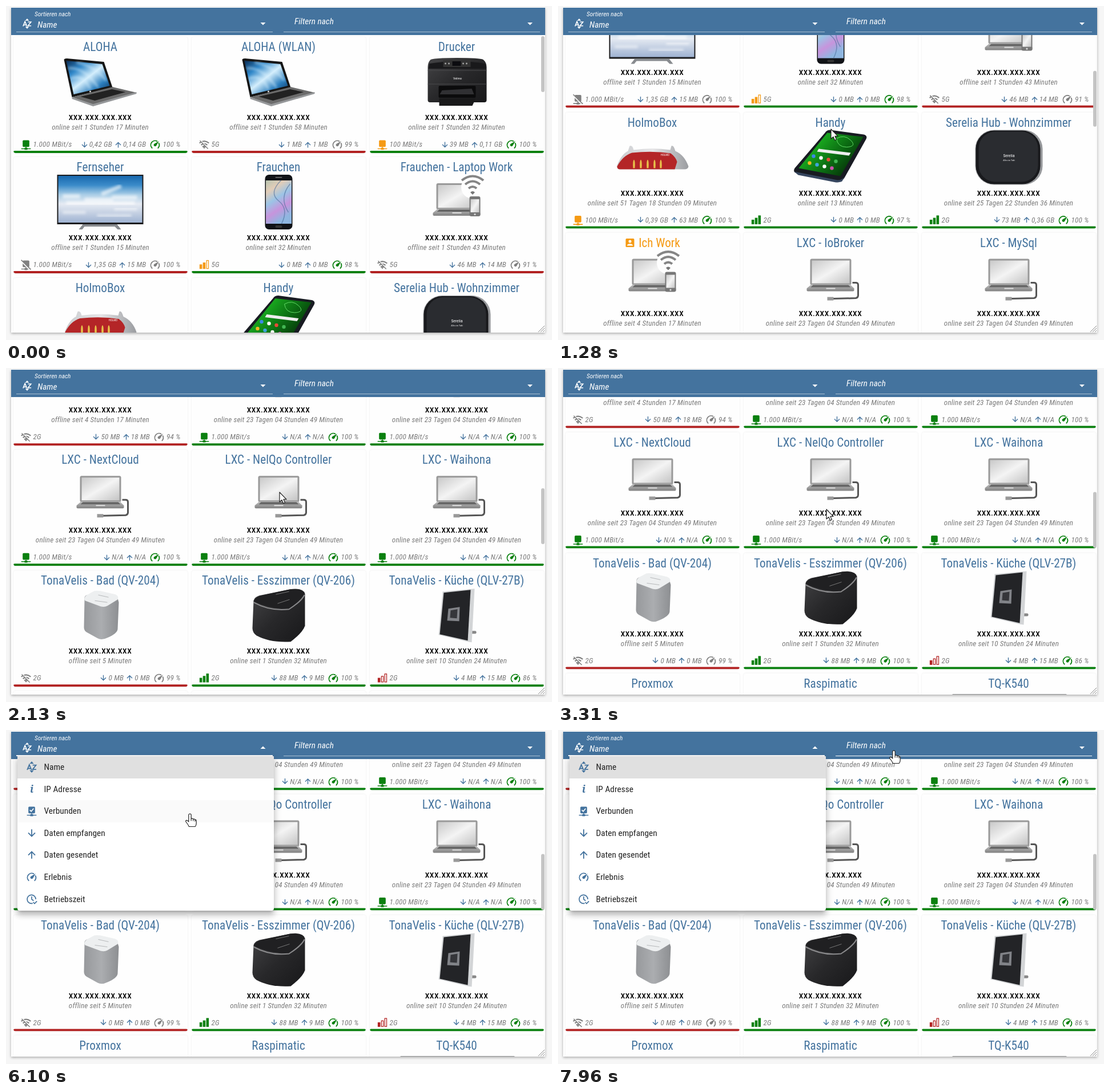
Write an HTML page that moves like this. It is 956 px wide and 586 px high and loops after 8000 ms.

```html
<!DOCTYPE html>
<html lang="de">
<head>
<meta charset="utf-8">
<title>Netzwerkgeräte</title>
<style>
:root { --blue: #44739e; --track: 0em; }
* { box-sizing: border-box; letter-spacing: var(--track); }
html, body { margin: 0; width: 100%; height: 100%; overflow: hidden; background: #f6f6f6; }
body { font-family: "Roboto Condensed", Roboto, sans-serif; font-stretch: 75%; white-space: pre; }
.abs { position: absolute; }
svg { display: block; overflow: visible; flex: none; }
#panel { left: 9px; top: 2px; width: 935px; height: 571px; background: #fff; overflow: hidden; }
#shadow { left: 9px; top: 3px; width: 935px; height: 570px; box-shadow: 0 2px 4px rgba(0,0,0,.22), 0 1px 6px rgba(0,0,0,.1); }
#view { left: 0; top: 49px; width: 935px; height: 522px; overflow: hidden; }
.card { position: absolute; width: 305px; height: 204px; border-radius: 4px; background: #fefefe;
  box-shadow: 0 0 3px rgba(0,0,0,.09); text-align: center; overflow: hidden; }
.card > * { position: absolute; left: 0; width: 100%; }
.title { top: 3px; line-height: 30px; font-size: 21.2px; color: var(--blue); display: flex; justify-content: center; align-items: center; gap: 5px; }
.pic { top: 31px; }
.ip { top: 131px; line-height: 20px; font-size: 13.5px; font-weight: 500; color: #000; letter-spacing: calc(var(--track) + .045em); }
.since, .stats { line-height: 20px; font-size: 13.2px; font-style: italic; color: #7b7b7b; }
.since { top: 149px; letter-spacing: calc(var(--track) + .01em); }
.stats { top: 179px; padding: 0 12px; display: flex; align-items: center; }
.stats span { margin-left: 3px; letter-spacing: calc(var(--track) + .015em); }
.stats .gap { flex: 1; }
.stats .arrow { margin-left: 3px; }
.stats .arrow + span { margin-left: 1px; }
.stats .gauge { margin-left: 6px; }
.bar { bottom: 0; height: 4px; border-radius: 2px; }
#head { left: 9px; top: 3px; width: 935px; height: 48px; background: var(--blue); }
.white { color: #fff; font-style: italic; font-size: 15.3px; line-height: 20px; }
.line { height: 1px; top: 45px; width: 449px; background: #fff; }
#menu { left: 20px; top: 46px; width: 449px; height: 271px; background: #fff; border-radius: 0 0 4px 4px; transform-origin: 0 0;
  box-shadow: 0 5px 5px -3px rgba(0,0,0,.2), 0 8px 10px 1px rgba(0,0,0,.14), 0 3px 14px 2px rgba(0,0,0,.12); }
.item { height: 38.55px; padding-left: 15px; display: flex; align-items: center; gap: 11.5px; font-size: 15.4px; color: #222; }
#thumb { left: 937px; top: 53px; width: 6px; height: 98px; border-radius: 3px; background: #c4c4c4; }
</style>
</head>
<body>
<svg width="0" height="0" class="abs"><defs id="defs"></defs></svg>
<div id="shadow" class="abs"></div>
<div id="panel" class="abs"><div id="view" class="abs"><div id="list" class="abs"></div></div></div>
<div id="thumb" class="abs"></div>
<svg class="abs" style="left:931px;top:560px" width="12" height="12"><path d="M1 12L12 1M5 12L12 5M9 12L12 9" stroke="#888" fill="none"/></svg>
<div id="head" class="abs"></div>
<div class="abs white" style="left:50px;top:4px;font-size:11.4px">Sortieren nach</div>
<div class="abs white" style="left:55px;top:23px">Name</div>
<div class="abs white" style="left:505px;top:17px">Filtern nach</div>
<div class="abs" id="sortIcon" style="left:28px;top:22px"></div>
<svg class="abs" style="left:0;top:0" width="956" height="51" fill="#fff"><path id="caret"/><path d="M913 29h9l-4.500 4.500z"/></svg>
<div class="abs line" id="sortLine" style="left:18px"></div>
<div class="abs line" id="filterLine" style="left:486px"></div>
<div class="abs" id="menu"></div>
<svg class="abs" id="cursor" width="20" height="24" style="left:0;top:0"><path fill="#fff" stroke="#222" stroke-width="1.2" stroke-linejoin="round"/></svg>

<script>
const $ = id => document.getElementById(id);
const BLUE = '#44739e', GREEN = '#0a800f', RED = '#b22222', ORANGE = '#f59a14', GREY = '#808080';

// Tighten the tracking when no condensed face is available.
const probe = document.body.appendChild(document.createElement('span'));
probe.style.cssText = 'position:absolute;font-size:100px;visibility:hidden';
probe.textContent = 'Frauchen - Laptop Work';
if (probe.offsetWidth > 985) document.documentElement.style.setProperty('--track', '-.055em');
probe.remove();

const grad = (id, x2, y2, ...colors) => `<linearGradient id="${id}" x2="${x2}" y2="${y2}">` +
  colors.map((c, i) => `<stop offset="${i / (colors.length - 1)}" stop-color="${c}"/>`).join('') + '</linearGradient>';
$('defs').innerHTML =
  grad('wave', 1, 1, '#0a2d55', '#2f86c8', '#d4eefc', '#2a7dbd', '#0b2c55') +
  grad('sky', 0, 1, '#1767ad', '#3b8bc9', '#a9cde6', '#e6ebf3', '#c3cfe2', '#9fb3d2') +
  grad('edge', .4, 1, '#b8c4b0', '#e2cdb8', '#9cc4e6', '#c794dc', '#8fb6e0') +
  grad('screen', 1, 1, '#c9c9c9', '#f4f4f4', '#c4c4c4') +
  grad('metal', 0, 1, '#c0c0c0', '#808080') +
  grad('leaf', 1, .6, '#063d0c', '#18a51e', '#0b6a12', '#052c08') +
  grad('black', 1, 1, '#444446', '#28282a', '#18181a') +
  grad('cloth', 1, 0, '#97999c', '#abadb0', '#8d8f92') +
  grad('side', 1, 0, '#c9cbce', '#e6e6e8', '#9a9ca0') +
  '<filter id="soft"><feGaussianBlur stdDeviation="2"/></filter>';

const path = (d, fill, more = '') => `<path d="${d}" fill="${fill}" ${more}/>`;
const stroke = (d, color, width = 2, more = '') => path(d, 'none', `stroke="${color}" stroke-width="${width}" ${more}`);
const rect = (x, y, w, h, fill, r = 0) => `<rect x="${x}" y="${y}" width="${w}" height="${h}" rx="${r}" fill="${fill}"/>`;
const dot = (x, y, r, fill) => `<circle cx="${x}" cy="${y}" r="${r}" fill="${fill}"/>`;
const label = (x, y, size, text) => `<text x="${x}" y="${y}" font-size="${size}" fill="#fff" text-anchor="middle">${text}</text>`;

const net = c => rect(5, 3, 14, 14, c, 2) + path('M11 17h2v2h2v1h7v2h-7v1H9v-1H2v-2h7v-1h2z', c);
const bars = n => c => [8, 12, 17].map((h, i) =>
  `<rect x="${3 + i * 7}" y="${20 - h}" width="4" height="${h}" fill="${i < n ? c : 'none'}" stroke="${c}" stroke-width="1.500"/>`).join('');
const icons = {
  net,
  netOff: c => net(c) + stroke('M1 3L21 23', '#fff', 3) + stroke('M2 2L22 22', c),
  netCheck: c => net(c) + stroke('M8 10l3 3 5-6', '#fff'),
  wifiOff: c => stroke('M2 9Q12 1 22 9M5.500 13Q12 7.500 18.500 13M8.500 17Q12 14 15.500 17', c, 2.600) + path('M9 17h6l-3 4z', c) +
    stroke('M4 3L22 21', '#fff', 2) + stroke('M3 4L20 21', c, 1.800),
  bars1: bars(1), bars2: bars(2), bars3: bars(3),
  down: c => stroke('M12 4v14M4.800 11.200L12 18.400l7.200-7.200', c, 2.200),
  up: c => stroke('M12 20V6M4.800 12.800L12 5.600l7.200 7.200', c, 2.200),
  gauge: c => stroke('M5.600 19.400A9 9 0 0 1 16 5M20 9.500a9 9 0 0 1-1.600 9.900', c, 2.200, 'stroke-linecap="round"') +
    path('M20.200 4.800L10.500 10.400a3 3 0 1 0 4.200 4z', c),
  sort: c => path('M12 0l4.500 5h-9zM12 24l4.500-5h-9z', c) + stroke('M2.500 18L7 7l4.500 11M4 15h6M14 8h7l-7 9h7.500', c, 2.200),
  info: c => `<text x="12" y="19" text-anchor="middle" fill="${c}" font-family="Noto Serif,serif" font-weight="700" font-style="italic" font-size="21">i</text>`,
  clock: c => stroke('M20.500 12A9 9 0 1 0 14 20.500M12 6v6l4 3M15 18l3 3 5-5', c),
  account: c => rect(3, 3, 18, 18, c, 2) + dot(12, 9, 3, '#fff') + path('M6 18q0-4 6-4t6 4z', '#fff')
};
const icon = (name, color, size = 20, cls = '') =>
  `<svg class="${cls}" width="${size}" height="${size}" viewBox="0 0 24 24">${icons[name](color)}</svg>`;

const greyLaptop = rect(-36, 15, 72, 46, '#999', 3) + rect(-33, 18, 66, 40, 'url(#screen)') +
  path('M-34 60H34L41 67V70Q41 72 38 72H-39Q-42 72-42 70V67z', 'url(#metal)') + path('M-31 61H31L35 65H-35z', '#666') +
  rect(-8, 66, 16, 2, '#ddd');
const pictures = {
  laptop: path('M-64 9Q-63 7-59 7L6 13L21 58L-50 75z', '#151515') + path('M-60 11L3 17L16 55L-47 70z', 'url(#wave)') +
    stroke('M-56 24Q-28 22-4 58M-52 42Q-30 34-18 61M-42 14Q-10 20 10 46', '#d8f1ff', 3, 'opacity=".6" filter="url(#soft)"') +
    path('M-50 75L21 57L63 67L-13 88z', '#6b6b6b') + path('M-35 74L20 61L44 66L-10 81z', '#222') +
    path('M-50 75L-13 87L63 66V69L-13 91L-50 78z', '#96989a') + dot(-18, 65, 1.5, '#ddd'),
  printer: path('M-46 9Q-40 6 0 6T46 9Q52 14 52 22V80Q52 84 48 84H-47Q-51 84-51 80V22Q-51 14-46 9z', 'url(#black)') +
    path('M-48 16Q0 8 49 16L51 25H-50z', '#19191b') + rect(-24, 10, 48, 12, '#333') + rect(-8, 12, 15, 8, '#0c0c10') +
    [-20, -14, 11, 17].map(x => dot(x, 16, 1.4, '#aaa')).join('') + stroke('M-51 28H52M-51 52H52', '#4b4b4d', 1) +
    label(1, 44, 6, 'Velmo') + rect(-32, 55, 65, 21, '#0b0b0c', 2) + path('M-26 63L26 60L30 70H-30z', '#303033') + path('M-31 77H33L27 90H-31z', '#19191a'),
  tv: rect(-76, 0, 151, 87, '#1c1c1e') + rect(-74, 2, 147, 82, 'url(#sky)') +
    stroke('M-66 38h30m8 6h50m-20-10l34-14m-16 20h44M-60 50h120', '#fff', 7, 'opacity=".6" filter="url(#soft)"') +
    stroke('M-66 66h40m20 6h60m-30-12h40', '#fff', 5, 'opacity=".5" filter="url(#soft)"') +
    path('M-31 87H29L36 96H30L25 91H-28L-32 96H-38z', '#888b8f'),
  phone: rect(-24, 0, 48, 96, '#111317', 7) + rect(-22.5, 10, 45, 76, 'url(#edge)') +
    stroke('M4 10Q-18 32 0 46T5 86M20 16Q0 40 17 66', '#4d6f9c', 1.5, 'opacity=".6"') +
    rect(-6, 4, 12, 1.5, '#777', 1) + rect(-6, 89, 12, 4, '#333', 2),
  wifiLaptop: greyLaptop + `<g transform="translate(27.500 31)">` + dot(0, -9, 20, '#fefefe') + path('M-4 0Q0-4 4 0L0 4z', '#777') +
    stroke('M-7-7Q0-13 7-7M-13-14Q0-25 13-14M-19-21Q0-36 19-21', '#858585', 4) + '</g>' +
    rect(22, 38, 19, 35, '#777', 3) + rect(24, 43, 15, 23, 'url(#screen)') + dot(31.5, 69.5, 1.6, '#ddd'),
  cableLaptop: greyLaptop + stroke('M38 57h6q4 0 4 4v18q0 4-4 5L3 85', '#555', 3) + rect(-6, 82, 11, 6, '#999'),
  router: path('M-62 62Q-54 42-43 37L-40 28Q-35 26-33 35Q0 30 31 35L33 28Q37 26 40 37Q56 44 63 64Q62 69 56 69H-57Q-63 68-62 62z', 'url(#side)') +
    path('M-62 64Q-52 45-36 40Q0 36 32 41Q41 48 43 56L39 69H-57Q-62 69-62 64z', '#b42527') +
    [-34, -22, -10, 2, 13].map(x => path(`M${x} 67q-1-13 1.500-15q2.500 2 1.500 15z`, '#e8c24a')).join('') + label(22, 45, 5, 'HOLMO'),
  handy: path('M-10 5Q-7 0-1 0L58 8Q65 10 62 16L24 84Q20 91 12 90L-59 76Q-67 74-63 67z', '#181b22') +
    path('M-6 5L57 12L17 81L-56 67z', 'url(#leaf)') + stroke('M10 15q14-8 25 3t-7 12q-16 0-18-15z', '#62d966', 1) +
    path('M-21 33L35 40L32 45L-24 38z', '#eee') +
    ['#3d87e8', '#fff', '#e54b37', '#43b754', '#f3b824', '#3fa4dd', '#fff', '#ca52aa'].map((c, i) => dot(-30 + i % 4 * 13 - (i >> 2) * 7, 46 + i % 4 * 3 + (i >> 2) * 12, 3.2, c)).join('') +
    path('M-64 73L12 88Q20 88 24 82L20 90Q16 92 9 92L-57 79z', '#36465f'),
  hub: rect(-59, 0, 118, 96, '#96989b', 33) + rect(-58, 1, 113, 94, '#18191c', 32) + rect(-53, 3, 104, 88, '#2a2c30', 29) + label(0, 47, 7.5, 'Serelia') + label(0, 54, 4, 'Alles im Takt'),
  whiteSpeaker: path('M-28 20Q-29 14-24 12L18 10Q31 14 32 25L30 72Q29 80 12 87Q2 92-5 88L-23 78Q-29 75-29 69z', 'url(#cloth)') +
    path('M-24 12L-11 5Q-7 4 0 5L26 11Q33 14 30 20L12 31Q7 34 0 32L-27 22Q-31 18-24 12z', '#edeff0') +
    stroke('M-4 12L14 16M-10 22L12 25', '#b6b8ba', 1),
  blackSpeaker: path('M-44 22Q-43 16-34 13L20 2Q43-1 46 10L46 66Q42 78 21 94Q-16 96-39 83Q-46 78-46 70z', 'url(#black)') +
    path('M-44 23Q-40 15-31 13L20 2Q42 0 45 10Q39 20 18 36Q-19 36-44 23z', '#202022') + stroke('M-44 25Q-15 41 18 37Q40 23 45 12', '#8a8a8c', 2) +
    stroke('M-5 11L18 6M-2 27L19 20', '#777', 1),
  panel: rect(22, 75, 12, 5, '#888', 2) + path('M-25 6L31 1L26 95L19 94L-32 82z', '#d3d5d7') + path('M-23 8L24 3L19 92L-30 81z', '#232427') +
    path('M-15 36L5 33L4 58L-17 57z', '#818388') + path('M-11 39L1 37L0 53L-12 52z', '#35363a'),
  receiver: rect(-100, 6, 202, 70, '#27282b', 2),
  none: ''
};

// title, picture, status and duration, link icon, link colour, link text, received, sent, experience
const longUp = '+23 Tagen 04 Stunden 49 Minuten';
const lxc = name => ['LXC - ' + name, 'cableLaptop', longUp, 'net', GREEN, '1.000 MBit/s', 'N/A', 'N/A', 100];
const devices = [
  ['ALOHA', 'laptop', '+1 Stunden 17 Minuten', 'net', GREEN, '1.000 MBit/s', '0,42 GB', '0,14 GB', 100],
  ['ALOHA (WLAN)', 'laptop', '-1 Stunden 58 Minuten', 'wifiOff', GREY, '5G', '1 MB', '1 MB', 99],
  ['Drucker', 'printer', '+1 Stunden 32 Minuten', 'net', ORANGE, '100 MBit/s', '39 MB', '0,11 GB', 100],
  ['Fernseher', 'tv', '-1 Stunden 15 Minuten', 'netOff', GREY, '1.000 MBit/s', '1,35 GB', '15 MB', 100],
  ['Frauchen', 'phone', '+32 Minuten', 'bars2', ORANGE, '5G', '0 MB', '0 MB', 98],
  ['Frauchen - Laptop Work', 'wifiLaptop', '-1 Stunden 43 Minuten', 'wifiOff', GREY, '5G', '46 MB', '14 MB', 91],
  ['HolmoBox', 'router', '+51 Tagen 18 Stunden 09 Minuten', 'net', ORANGE, '100 MBit/s', '0,39 GB', '63 MB', 100],
  ['Handy', 'handy', '+13 Minuten', 'bars3', GREEN, '2G', '0 MB', '0 MB', 97],
  ['Serelia Hub - Wohnzimmer', 'hub', '+25 Tagen 22 Stunden 36 Minuten', 'bars3', GREEN, '2G', '73 MB', '0,36 GB', 100],
  ['Ich Work', 'wifiLaptop', '-4 Stunden 17 Minuten', 'wifiOff', GREY, '2G', '50 MB', '18 MB', 94],
  lxc('IoBroker'), lxc('MySql'), lxc('NextCloud'), lxc('NelQo Controller'), lxc('Waihona'),
  ['TonaVelis - Bad (QV-204)', 'whiteSpeaker', '-5 Minuten', 'wifiOff', GREY, '2G', '0 MB', '0 MB', 99],
  ['TonaVelis - Esszimmer (QV-206)', 'blackSpeaker', '+1 Stunden 32 Minuten', 'bars3', GREEN, '2G', '88 MB', '9 MB', 100],
  ['TonaVelis - Küche (QLV-27B)', 'panel', '+10 Stunden 24 Minuten', 'bars1', RED, '2G', '4 MB', '15 MB', 86],
  ...['Proxmox', 'Raspimatic', 'TQ-K540'].map((name, i) =>
    [name, i < 2 ? 'none' : 'receiver', longUp, 'net', GREEN, '1.000 MBit/s', 'N/A', 'N/A', 100])
];
$('list').innerHTML = devices.map(([title, pic, since, link, color, speed, got, sent, exp], i) => {
  const online = since[0] === '+', mine = title === 'Ich Work', state = online ? GREEN : GREY;
  return `<div class="card" style="left:${3.5 + i % 3 * 312}px;top:${3 + (i / 3 | 0) * 211.3}px">` +
    `<div class="title" ${mine ? `style="color:${ORANGE}"` : ''}>${mine ? icon('account', ORANGE) : ''}<span>${title}</span></div>` +
    `<svg class="pic" height="96" viewBox="-152.500 0 305 96">${pictures[pic]}</svg>` +
    `<div class="ip">XXX.XXX.XXX.XXX</div><div class="since">${online ? 'online' : 'offline'} seit ${since.slice(1)}</div>` +
    `<div class="stats">${icon(link, color)}<span>${speed}</span><i class="gap"></i>` +
    `${icon('down', BLUE, 15, 'arrow')}<span>${got}</span>${icon('up', BLUE, 15, 'arrow')}<span>${sent}</span>` +
    `${icon('gauge', state, 20, 'gauge')}<span>${exp} %</span></div>` +
    `<div class="bar" style="background:${online ? GREEN : RED}"></div></div>`;
}).join('');

$('sortIcon').innerHTML = icon('sort', '#fff', 18);
$('menu').innerHTML = [['sort', 'Name'], ['info', 'IP Adresse'], ['netCheck', 'Verbunden'], ['down', 'Daten empfangen'],
  ['up', 'Daten gesendet'], ['gauge', 'Erlebnis'], ['clock', 'Betriebszeit']]
  .map(([name, text]) => `<div class="item">${icon(name, BLUE)}<span>${text}</span></div>`).join('');
const items = [...document.querySelectorAll('.item')];
const pointer = $('cursor').firstChild;
const ARROW = 'M0 0V17L4 13.500L6.600 19.500L9.500 18.300L7 12.400H12z';
const HAND = 'M-2.200 2.200a2.200 2.200 0 0 1 4.400 0V8.500q2.500-1.200 3.600.8 2.400-.8 3.200 1.200 2.200-.4 2.200 2V17q0 3-2 5.500H-1.500Q-3 19-7 14q-1-2 1-2.600 2 0 3.800 2.600zM2.200 8.500v4M5.800 9.300v3.500M9 10.500v3';

const bursts = [[210, 360], [530, 2280], [3310, 4090], [4550, 5790], [5940, 7490], [7660, 7960]];
// time, position, speed per ms
const scrollKeys = [[460, 0, 0], [758, 73.5, .34], [1291, 290.5, .54], [1748, 589.5, .52], [2280, 786.5, .1]];
// time, x, y
const cursorKeys = [[210, 701, 445], [360, 480, 206], [758, 480, 208], [1291, 478, 216], [2280, 479, 218], [3230, 479, 218],
  [3310, 470, 248], [3700, 462, 370], [4090, 476, 420], [4470, 476, 420], [4900, 400, 200], [5320, 322, 29], [5865, 322, 29],
  [6095, 322, 147], [6710, 317, 259], [7490, 314, 141], [7585, 314, 141], [7960, 588, 36]];

function stepped(t) {
  let result = 0;
  for (const [start, end] of bursts) if (t >= start) {
    const step = (end - start) / Math.round((end - start) / 76.5);
    result = Math.min(end, start + Math.floor((t - start) / step + .2) * step);
  }
  return result;
}
function span(keys, t) {
  const i = Math.max(0, Math.min(keys.length - 2, keys.findLastIndex(k => k[0] <= t)));
  const a = keys[i], b = keys[i + 1], width = b[0] - a[0];
  return { a, b, width, u: Math.max(0, Math.min(1, (t - a[0]) / width)) };
}
function scrollAt(t) {
  const { a, b, width, u } = span(scrollKeys, t), v = 1 - u;
  return v * v * (1 + 2 * u) * a[1] + u * u * (3 - 2 * u) * b[1] + width * u * v * (v * a[2] - u * b[2]);
}

function draw(now) {
  const t = stepped(now % 8000);
  const scroll = scrollAt(t);
  $('list').style.transform = `translateY(${-scroll}px)`;
  $('thumb').style.transform = `translateY(${scroll * .209}px)`;

  const { a, b, u } = span(cursorKeys, t);
  const x = Math.round(a[1] + (b[1] - a[1]) * u), y = Math.round(a[2] + (b[2] - a[2]) * u);
  const open = t >= 5399, inHead = t > 0 && y < 50, inMenu = open && !inHead && x < 469;
  $('cursor').style.visibility = t ? 'visible' : 'hidden';
  $('cursor').style.transform = `translate(${x}px,${y}px)`;
  pointer.setAttribute('d', inHead || inMenu ? HAND : ARROW);

  const p = Math.max(0, Math.min(1, (t - 5360) / 220));
  $('menu').style.transform = `scale(${.8 + .2 * p * (2 - p)})`;
  $('menu').style.opacity = open ? Math.min(1, p * 2) : 0;
  items.forEach((item, i) => {
    const hovered = inMenu && Math.floor((y - 46) / 38.55) === i;
    item.style.background = i === 0 ? '#e0e0e0' : hovered ? '#fafafa' : '';
  });
  $('caret').setAttribute('d', open ? 'M445.500 33h9l-4.500-4.500z' : 'M445.500 29h9l-4.500 4.500z');
  $('sortLine').style.opacity = open || inHead && x < 480 ? 1 : .55;
  $('sortLine').style.height = open ? '2px' : '1px';
  $('sortLine').style.top = open ? '44px' : '45px';
  $('filterLine').style.opacity = inHead && x > 485 ? 1 : .55;
}
const begin = performance.now();
(function loop() {
  draw(performance.now() - begin);
  requestAnimationFrame(loop);
})();
</script>
</body>
</html>
```
